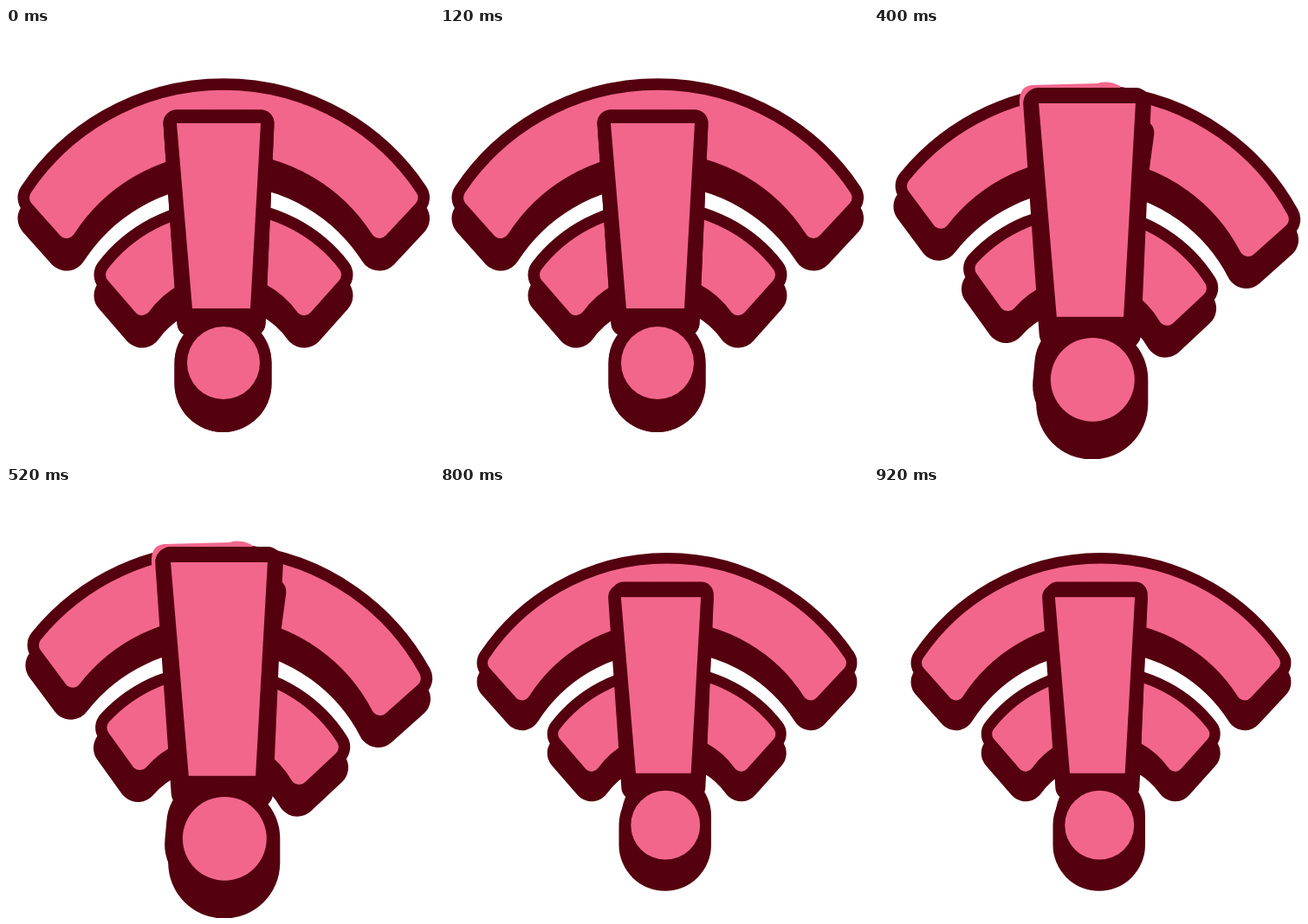
These frames come from a looping animation (494x498 px, 1000 ms). An HTML page with a canvas:

```html
<!DOCTYPE html>
<html>
<head>
<meta charset="utf-8">
<style>
html, body { margin: 0; width: 100%; height: 100%; overflow: hidden; background: #fff; }
canvas { display: block; }
</style>
</head>
<body>
<canvas id="stage" width="494" height="498"></canvas>
<script>
const ctx = document.getElementById('stage').getContext('2d');
const PINK = '#f2668c', DARK = '#54000f';
const DEPTH = 24, STEP = 200;

const bands = new Path2D(
  'M37 196A258 258 0 0 1 465.5 196L431 233A214 214 0 0 0 70 233Z' +
  'M125 285A159 159 0 0 1 377 285L344 322A115 115 0 0 0 157 322Z');
const bar = new Path2D('M197 110H294L282 324H215Z');
const barBack = new Path2D('M197 110H294L284 341H213Z');
const dot = new Path2D();
dot.arc(251, 387, 42, 0, 7);
const dotBack = new Path2D('M250.5 387V411');
const rim = new Path2D(
  'M172 131Q165 128 167 112L169 95Q164 68 182 66L258 64Q270 60 284 67L290 80H190V120Z');

// Each pose: pivot, where the pivot lands, scale, turn in degrees
const at = (px, py, x, y, scale = 1, turn = 0) => ({ px, py, x, y, scale, turn });
const sign = (x, y, s, turn) => at(250.5, 243.5, x, y, s, turn);
const mark = (x, y, s) => at(245.5, 217, x, y, s);
const big = mark(246, 210.3, 1.153);
const poses = [
  { sign: sign(250.5, 243.5), mark: mark(245.5, 217) },
  { sign: sign(250.5, 243.5), mark: big, rim: true },
  { sign: sign(253.4, 248.4, 0.987, 5.2), mark: big, rim: true },
  { sign: sign(247.3, 253.8, 0.914, -6.5), mark: big, rim: true },
  { sign: sign(261.3, 247, 0.923), mark: mark(255, 229, 0.951) }
];

function paint(path, color, width) {
  ctx.fillStyle = ctx.strokeStyle = color;
  ctx.lineWidth = width;
  ctx.fill(path);
  if (width) ctx.stroke(path);
}

function drawBands() {
  ctx.save();
  ctx.translate(0, DEPTH);
  paint(bands, DARK, 47);
  ctx.restore();
  paint(bands, DARK, 47);
  paint(bands, PINK, 20);
}

function drawMark() {
  paint(barBack, DARK, 31);
  paint(dotBack, DARK, 112);
  paint(bar, PINK);
  paint(dot, PINK);
}

function place(p, draw) {
  ctx.save();
  ctx.translate(p.x, p.y);
  ctx.rotate(p.turn * Math.PI / 180);
  ctx.scale(p.scale, p.scale);
  ctx.translate(-p.px, -p.py);
  draw();
  ctx.restore();
}

function frame() {
  const pose = poses[Math.floor(performance.now() / STEP) % poses.length];
  ctx.clearRect(0, 0, 494, 498);
  ctx.lineJoin = ctx.lineCap = 'round';
  place(pose.sign, () => { drawBands(); drawMark(); });
  if (pose.rim) paint(rim, PINK);
  place(pose.mark, drawMark);
  requestAnimationFrame(frame);
}
frame();
</script>
</body>
</html>
```
